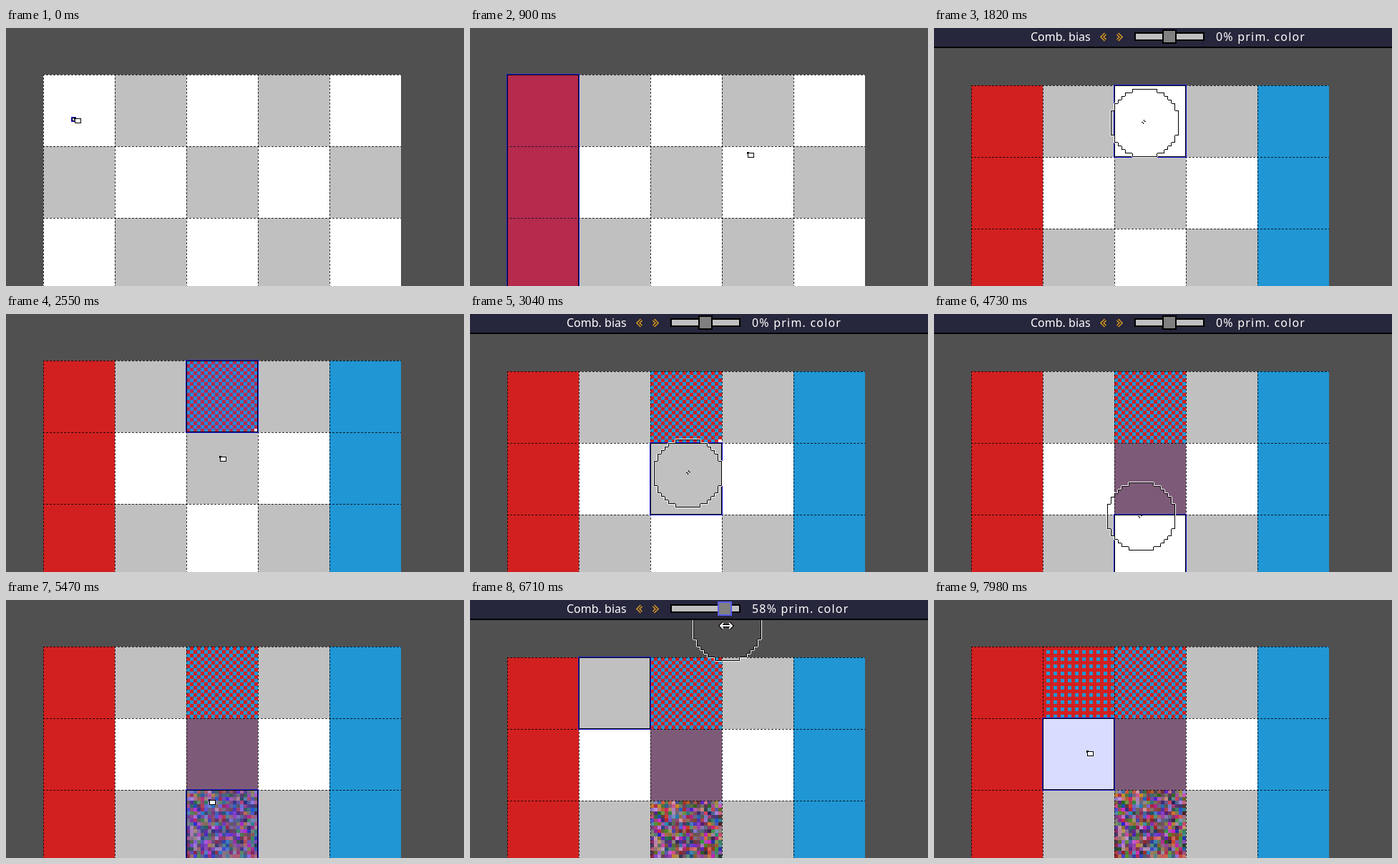
Write an HTML page with a canvas that moves like this. It is 640 px wide and 360 px high and loops after 8000 ms.

```html
<!DOCTYPE html>
<html>
<head>
<meta charset="utf-8">
<style>
html, body { margin: 0; width: 100%; height: 100%; overflow: hidden; background: #505050; }
canvas { display: block; width: 640px; height: 360px; }
</style>
</head>
<body>
<canvas id="stage" width="640" height="360"></canvas>
<script>
const ctx = document.getElementById('stage').getContext('2d');
const LOOP = 8000, LEFT = 52, CELL = 100, PX = 5;
const TOOL_TOP = 65, BRUSH_TOP = 80;
const RED = '#d22020', BLUE = '#2096d4', PURPLE = '#7d5b78';

const clamp = v => Math.max(0, Math.min(1, v));
const ease = v => { v = clamp(v); return v * v * (3 - 2 * v); };
const lerp = (a, b, n) => a + (b - a) * n;

const noise = (x, y, k) => {
  const v = Math.sin(x * 12.9898 + y * 78.233 + k * 37.719) * 43758.5453;
  return v - Math.floor(v);
};
const checker = (x, y) => (x + y) % 2 ? RED : BLUE;
const spots = (x, y) => x % 2 && y % 2 ? BLUE : RED;
const blend = () => PURPLE;
const speckle = (x, y) => {
  const channel = (max, k) => Math.round(lerp(32, max, noise(x, y, k)));
  return `rgb(${channel(210, 1)},${channel(150, 2)},${channel(212, 3)})`;
};

// Each step selects a cell, then drags down and fills, or paints with the brush.
const steps = [
  { col: 0, row: 0, at: [100, 129], pick: 0, drag: 490, fill: RED },
  { col: 4, row: 0, at: [500, 120], pick: 1000, drag: 1340, fill: BLUE },
  { col: 2, row: 0, at: [293, 131], pick: 1620, from: 1850, to: 2360, ink: checker, missed: true },
  { col: 2, row: 1, at: [305, 221], pick: 2630, from: 3050, to: 3500, ink: blend },
  { col: 2, row: 0, at: [303, 129], pick: 3640, from: 4000, to: 4170, ink: checker },
  { col: 2, row: 2, at: [288, 282], pick: 4480, from: 4790, to: 5300, ink: speckle },
  { col: 1, row: 0, at: [200, 127], pick: 5770, slide: 6370, from: 6860, to: 7440, ink: spots },
  { col: 1, row: 1, at: [218, 214], pick: 7780 }
];
const strokes = steps.filter(s => s.ink);
const slideStart = steps.find(s => s.slide).slide, slideEnd = slideStart + 390;
const isBrush = t => strokes.some(s => t >= s.pick + 180 && t < s.to + 80);

const keys = [];
let last = steps[0].at, free = 0;
for (const s of steps) {
  keys.push([Math.max(free, s.pick - 290), ...last], [s.pick, ...s.at]);
  last = s.drag ? [s.at[0], 330] : s.at;
  if (s.drag) keys.push([s.pick + 80, ...s.at], [s.drag, ...last]);
  if (s.slide) {
    keys.push([s.pick + 200, ...s.at], [s.slide - 30, 344, 32], [s.slide, 344, 32],
      [s.slide + 150, 358, 36], [slideEnd, 358, 36], [s.from, ...s.at]);
  }
  free = s.drag || s.to || s.pick;
}
keys.push([LOOP, ...last]);

function cursorAt(t) {
  let i = 0;
  while (i < keys.length - 2 && keys[i + 1][0] <= t) i++;
  const [t0, x0, y0] = keys[i], [t1, x1, y1] = keys[i + 1];
  const n = ease((t - t0) / (t1 - t0));
  let x = lerp(x0, x1, n), y = lerp(y0, y1, n);
  const s = strokes.find(s => t >= s.from && t < s.to);
  if (s) {
    // Circle the cell once, easing out of and back to the resting point.
    const n = (t - s.from) / (s.to - s.from), a = n * Math.PI * 2;
    const amount = clamp(Math.min(n, 1 - n) * 6);
    x = lerp(x, LEFT + (s.col + 0.5) * CELL + 33 * Math.cos(a), amount);
    y = lerp(y, BRUSH_TOP + (s.row + 0.5) * CELL + 33 * Math.sin(a), amount);
  }
  return { x, y };
}

const inDisk = (dx, dy) => dx * dx + dy * dy <= 90.25;
const gridPixel = (p, top) => [Math.floor((p.x - LEFT) / PX), Math.floor((p.y - top) / PX)];

function rect(x, y, w, h, color) {
  ctx.fillStyle = color;
  ctx.fillRect(x, y, w, h);
}

function ring(x, y, w, h, color) {
  ctx.strokeStyle = color;
  ctx.lineWidth = 1;
  ctx.strokeRect(x + 0.5, y + 0.5, w - 1, h - 1);
}

function line(points, color, width) {
  ctx.strokeStyle = color;
  ctx.lineWidth = width;
  ctx.beginPath();
  points.forEach(([x, y]) => ctx.lineTo(x, y));
  ctx.stroke();
}

function drawCells(t, top) {
  for (let row = 0; row < 3; row++) {
    for (let col = 0; col < 5; col++) {
      const filled = steps.find(s => s.fill && s.col === col && t >= s.drag + 150);
      const color = filled ? filled.fill : (col + row) % 2 ? '#c0c0c0' : '#fff';
      rect(LEFT + col * CELL, top + row * CELL, CELL, CELL, color);
    }
  }
}

function drawPaint(s, t, top) {
  if (t < s.from) return;
  const done = t >= s.to, stamps = [];
  for (let m = s.from; !done && m <= t; m += 8) stamps.push(gridPixel(cursorAt(m), BRUSH_TOP));
  for (let j = 0; j < 20; j++) {
    for (let i = 0; i < 20; i++) {
      if (s.missed && i + j === 38) continue;
      const x = s.col * 20 + i, y = s.row * 20 + j;
      if (done || stamps.some(([sx, sy]) => inDisk(x - sx, y - sy)))
        rect(LEFT + x * PX, top + y * PX, PX, PX, s.ink(x, y));
    }
  }
}

function drawGrid(top) {
  ctx.setLineDash([3, 2]);
  ctx.lineDashOffset = 1;
  for (let i = 0; i < 5; i++) {
    const x = LEFT + i * CELL + 0.5;
    line([[x, top], [x, 360]], 'rgba(0,0,0,.8)', 1);
  }
  for (let i = 0; i < 3; i++) {
    const y = top + i * CELL + 0.5;
    line([[LEFT, y], [LEFT + 500, y]], 'rgba(0,0,0,.8)', 1);
  }
  ctx.setLineDash([]);
}

function drawSelection(t, top, brush) {
  const s = steps.filter(s => s.pick <= t).pop();
  const n = ease((t - s.pick - 80) / 60), [sx, sy] = s.at;
  const cx = LEFT + s.col * CELL, cy = top + s.row * CELL;
  const pull = s.drag ? ease((t - s.pick - 140) / (s.drag - s.pick - 140)) : 0;
  const x = Math.round(lerp(sx - 8, cx, n)), y = Math.round(lerp(sy - 4, cy, n));
  const w = Math.round(lerp(5, CELL, n));
  const h = Math.round(lerp(5, lerp(CELL, 3 * CELL, pull), n));
  if (!brush) rect(x, y, w, h, 'rgba(64,80,255,.2)');
  ring(x - 1, y - 1, w + 2, h + 2, '#1e1ee0');
  ring(x, y, w, h, '#000');
}

function drawBrush(p, top) {
  const [bx, by] = gridPixel(p, top);
  for (const [color, o] of [['#fff', 1], ['#000', 0]]) {
    for (let dy = -9; dy <= 9; dy++) {
      for (let dx = -9; dx <= 9; dx++) {
        if (!inDisk(dx, dy)) continue;
        const x = LEFT + (bx + dx) * PX, y = top + (by + dy) * PX;
        if (!inDisk(dx - 1, dy)) rect(x - o, y, 1, PX, color);
        if (!inDisk(dx + 1, dy)) rect(x + PX - 1 + o, y, 1, PX, color);
        if (!inDisk(dx, dy - 1)) rect(x, y - o, PX, 1, color);
        if (!inDisk(dx, dy + 1)) rect(x, y + PX - 1 + o, PX, 1, color);
      }
    }
  }
}

function drawCross(x, y) {
  rect(x - 3, y, 2, 1, '#000');
  rect(x + 1, y - 1, 2, 1, '#000');
  rect(x - 1, y + 1, 1, 2, '#000');
  rect(x, y - 3, 1, 2, '#000');
}

function drawResize(x, y) {
  for (const [color, width] of [['#000', 4.5], ['#fff', 2]]) {
    line([[x - 6, y], [x + 6, y]], color, width);
    for (const d of [-1, 1])
      line([[x + d * 4, y - 4], [x + d * 8, y], [x + d * 4, y + 4]], color, width);
  }
}

function drawPointer(x, y) {
  rect(x - 5, y - 4, 3, 3, '#000');
  rect(x - 4, y - 3, 1, 1, '#fff');
  rect(x - 4, y - 3, 9, 7, '#000');
  rect(x - 3, y - 2, 7, 5, '#fff');
}

function chevron(x, dir) {
  const shape = [[x - dir * 2.5, 8], [x + dir * 2, 12.5], [x - dir * 2.5, 17]];
  line(shape, '#d09a30', 4.5);
  line(shape, '#302418', 1.5);
}

function label(text, x, spacing) {
  ctx.font = '16px "Noto Sans", sans-serif';
  ctx.letterSpacing = spacing + 'px';
  ctx.fillStyle = '#fff';
  ctx.fillText(text, x, 18);
}

function drawBar(t, dragging) {
  const pos = t < slideStart ? 331 : cursorAt(Math.min(t, slideEnd)).x;
  const knob = Math.round(pos) - 2;
  rect(0, 0, 640, 28, '#000');
  rect(0, 0, 640, 26, '#26263c');
  label('Comb. bias', 135, 0);
  chevron(237, -1);
  chevron(259, 1);
  rect(280, 6, 98, 12, '#000');
  rect(282, 8, 94, 8, '#c0c0c0');
  rect(knob - 10, 2, 20, 20, dragging ? '#5a5af0' : '#000');
  rect(knob - 8, 4, 16, 16, '#808080');
  label(Math.round((pos - 331) * 2.15) + '% prim. color', 394, 1.2);
}

function draw(t) {
  const brush = isBrush(t), dragging = t >= slideStart && t < slideEnd;
  const top = brush ? BRUSH_TOP : TOOL_TOP, p = cursorAt(t);
  const x = Math.round(p.x), y = Math.round(p.y);
  rect(0, 0, 640, 360, '#505050');
  drawCells(t, top);
  strokes.forEach(s => drawPaint(s, t, top));
  drawGrid(top);
  drawSelection(t, top, brush);
  if (brush) {
    drawBrush(p, top);
    (dragging ? drawResize : drawCross)(x, y);
    drawBar(t, dragging);
  } else {
    drawPointer(x, y);
  }
}

const began = performance.now();
function frame() {
  draw((performance.now() - began) % LOOP);
  requestAnimationFrame(frame);
}
frame();
</script>
</body>
</html>
```
